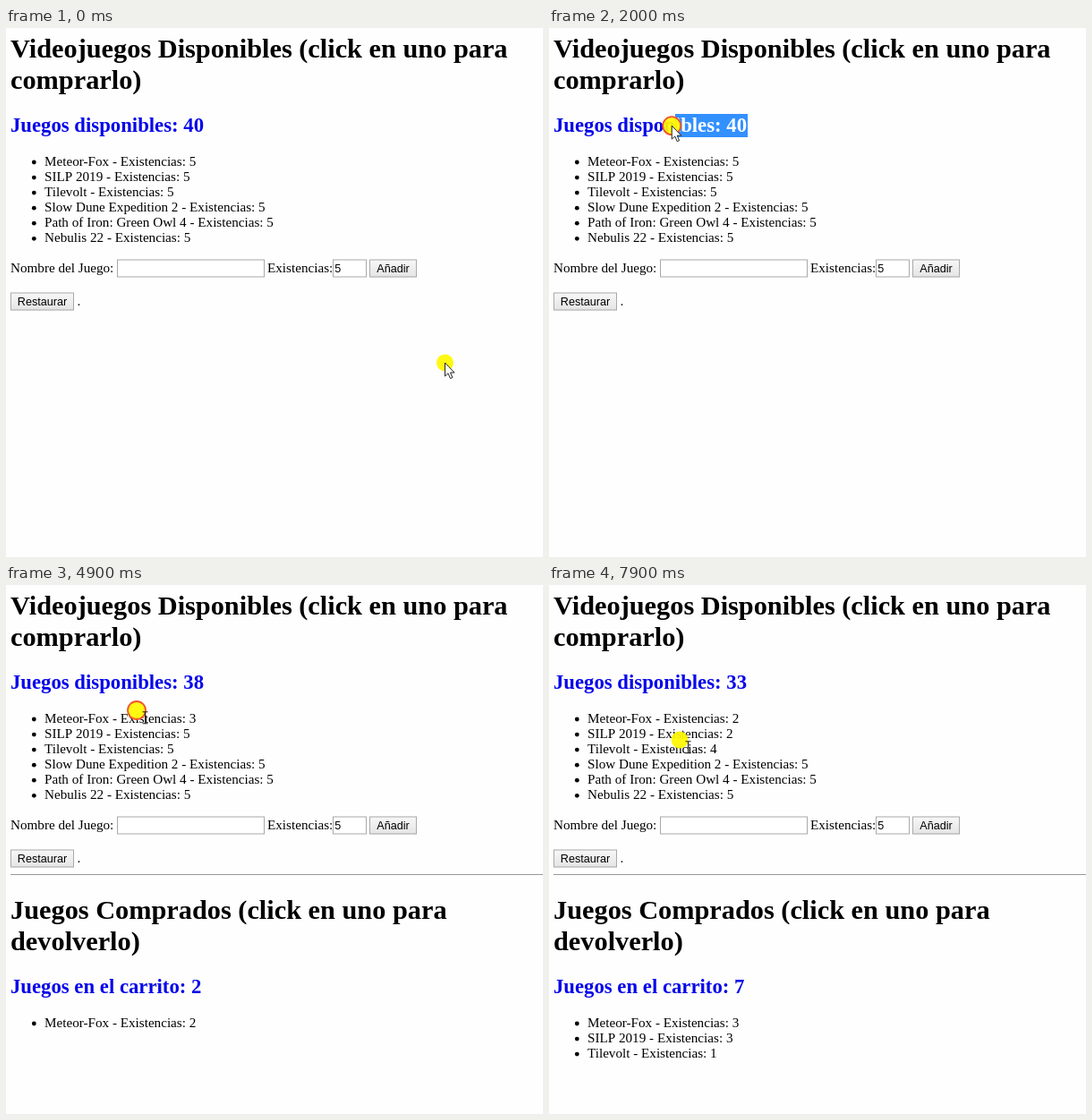
Animation of 600 by 591 pixels, one loop 8 s. Source, as an HTML page with a canvas:

```html
<!DOCTYPE html>
<html lang="es">
<head>
<meta charset="utf-8">
<title>Videojuegos</title>
<style>
  html, body { margin: 0; width: 100%; height: 100%; overflow: hidden; background: #fefefe; }
  canvas { display: block; }
</style>
</head>
<body>
<canvas id="stage" width="600" height="591"></canvas>
<script>
const ctx = document.getElementById('stage').getContext('2d');
const LOOP = 8000, STEP = 100;

// The page is a default-styled document shown at a reduced zoom.
const ZOOM = 0.9475, LEFT = 5, ROW = 18 * ZOOM, CONTROL_H = 20, CART_Y = 340;
const SERIF = '"Liberation Serif", "Times New Roman", serif';
const SANS = '"Liberation Sans", Arial, sans-serif';
const BODY = `${16 * ZOOM}px ${SERIF}`;
const TITLE = `bold ${32 * ZOOM}px ${SERIF}`;
const SUBTITLE = `bold ${24 * ZOOM}px ${SERIF}`;
const CONTROL = `${13.33 * ZOOM}px ${SANS}`;
const INK = '#000', BLUE = '#0606ea', BORDER = '#a9a9a9';

const games = ['Meteor-Fox', 'SILP 2019', 'Tilevolt', 'Slow Dune Expedition 2',
               'Path of Iron: Green Owl 4', 'Nebulis 22'];
const STOCK = 5, TOTAL = 40;

// Each visited game is bought three times at a steady pace.
const visits = [3900, 5900, 7500];
const BUYS = 3, BUY_GAP = 500, CLICK_DELAY = 100, RING_TIME = 200;
const drag = { start: 1700, end: 2400, right: 222 };

// Pointer stops: an opening sweep and drag, then a rest on each visited row.
const stops = [
  { t: 0, x: 490.5, y: 374 },
  { t: 900, x: 232, y: 116 },
  { t: 1300, x: 192, y: 93 },
  { t: drag.start, x: 223, y: 108 },
  { t: drag.end, x: LEFT, y: 111 },
  { t: 2800, x: 9, y: 112 },
  { t: 3300, x: 121, y: 146 }
];
visits.forEach((start, row) => {
  const rest = { x: 146, y: 140 + 16.5 * row };
  stops.push({ t: start - 200, ...rest }, { t: start + BUYS * BUY_GAP - 100, ...rest });
});

function pointerAt(t) {
  const i = stops.findIndex(stop => stop.t > t);
  const a = stops[i - 1], b = stops[i];
  const p = (t - a.t) / (b.t - a.t), k = p * p * (3 - 2 * p);
  return { x: a.x + (b.x - a.x) * k, y: a.y + (b.y - a.y) * k };
}

// Number of buys whose press lies at or before t.
function buys(start, t) {
  return Math.max(0, Math.min(BUYS, Math.floor((t - start) / BUY_GAP) + 1));
}

function text(str, x, y, font = BODY, color = INK) {
  ctx.font = font;
  ctx.fillStyle = color;
  ctx.fillText(str, x, Math.round(y));
}

function circle(x, y, r) {
  ctx.beginPath();
  ctx.arc(x, y, r, 0, Math.PI * 2);
}

function box(x, y, w, fill = '#fff') {
  ctx.fillStyle = fill;
  ctx.fillRect(x, y, w, CONTROL_H);
  ctx.strokeStyle = BORDER;
  ctx.lineWidth = 1;
  ctx.strokeRect(x + 0.5, y + 0.5, w - 1, CONTROL_H - 1);
}

function button(label, x, y, w) {
  const shade = ctx.createLinearGradient(0, y, 0, y + CONTROL_H);
  shade.addColorStop(0, '#f8f8f8');
  shade.addColorStop(1, '#e4e4e4');
  box(x, y, w, shade);
  ctx.textAlign = 'center';
  text(label, x + w / 2, y + 14.5, CONTROL);
  ctx.textAlign = 'left';
}

function list(items, top) {
  items.forEach(([name, count], i) => {
    const y = top + i * ROW;
    circle(31.3, y - 4, 2.4);
    ctx.fillStyle = INK;
    ctx.fill();
    text(`${name} - Existencias: ${count}`, 43, y);
  });
}

function section(line1, line2, summary, items, top) {
  text(line1, LEFT, top + 33, TITLE);
  text(line2, LEFT, top + 68, TITLE);
  text(summary, LEFT, top + 116, SUBTITLE, BLUE);
  list(items, top + 154);
}

function form() {
  const y = 258.5;
  text('Nombre del Juego:', LEFT, 273);
  box(124, y, 165);
  text('Existencias:', 292, 273);
  box(365, y, 38);
  text('5', 367.3, 273, CONTROL);
  button('Añadir', 406, y, 53);
  button('Restaurar', LEFT, y + 37, 71);
  text('.', 79.5, 310);
}

function selection(summary, x) {
  ctx.save();
  ctx.beginPath();
  ctx.rect(x, 96, drag.right - x, 26);
  ctx.clip();
  ctx.fillStyle = '#3390ff';
  ctx.fill();
  text(summary, LEFT, 116, SUBTITLE, '#fff');
  ctx.restore();
}

const arrowShape = new Path2D('M0 0V15L3.5 11.8L6 17.5L8.4 16.5L6 11H10.6Z');

function arrow(x, y) {
  ctx.save();
  ctx.translate(x, y);
  ctx.fillStyle = '#fff';
  ctx.fill(arrowShape);
  ctx.strokeStyle = '#222';
  ctx.lineWidth = 1;
  ctx.stroke(arrowShape);
  ctx.restore();
}

function beam(x, y) {
  x = Math.round(x) + 0.5;
  ctx.beginPath();
  ctx.moveTo(x, y - 6);
  ctx.lineTo(x, y + 6);
  for (const end of [y - 6.5, y + 6.5]) {
    ctx.moveTo(x - 3, end);
    ctx.lineTo(x + 3, end);
  }
  ctx.strokeStyle = '#222';
  ctx.lineWidth = 1.1;
  ctx.stroke();
}

function pointer(t, { x, y }) {
  const dragging = t >= drag.start && t < drag.end;
  const clicking = visits.some(start => buys(start, t) > buys(start, t - RING_TIME));
  circle(x, y, 9.5);
  ctx.fillStyle = 'rgba(255, 248, 0, 0.93)';
  ctx.fill();
  if (dragging || clicking) {
    circle(x, y, 10);
    ctx.strokeStyle = '#f0552c';
    ctx.lineWidth = 1.8;
    ctx.stroke();
  }
  const overText = t >= 900 && !dragging;
  if (overText) beam(x + 9.3, y + 8.2);
  else arrow(x, y);
}

function draw(t) {
  const bought = games.map((_, i) => i in visits ? buys(visits[i], t - CLICK_DELAY) : 0);
  const inCart = bought.reduce((sum, n) => sum + n, 0);
  const summary = `Juegos disponibles: ${TOTAL - inCart}`;
  const mouse = pointerAt(t);

  ctx.fillStyle = '#fefefe';
  ctx.fillRect(0, 0, 600, 591);
  section('Videojuegos Disponibles (click en uno para', 'comprarlo)', summary,
    games.map((name, i) => [name, STOCK - bought[i]]), 0);
  form();

  if (t > drag.start && !inCart) {
    const edge = t < drag.end ? mouse.x + 3.5 : LEFT;
    selection(summary, Math.min(drag.right, edge));
  }

  if (inCart) {
    ctx.fillStyle = '#999';
    ctx.fillRect(LEFT, 323, 595, 1);
    section('Juegos Comprados (click en uno para', 'devolverlo)',
      `Juegos en el carrito: ${inCart}`,
      games.map((name, i) => [name, bought[i]]).filter(item => item[1]), CART_Y);
  }
  pointer(t, mouse);
}

function tick() {
  draw(Math.floor(performance.now() % LOOP / STEP) * STEP);
  requestAnimationFrame(tick);
}
tick();
</script>
</body>
</html>
```
